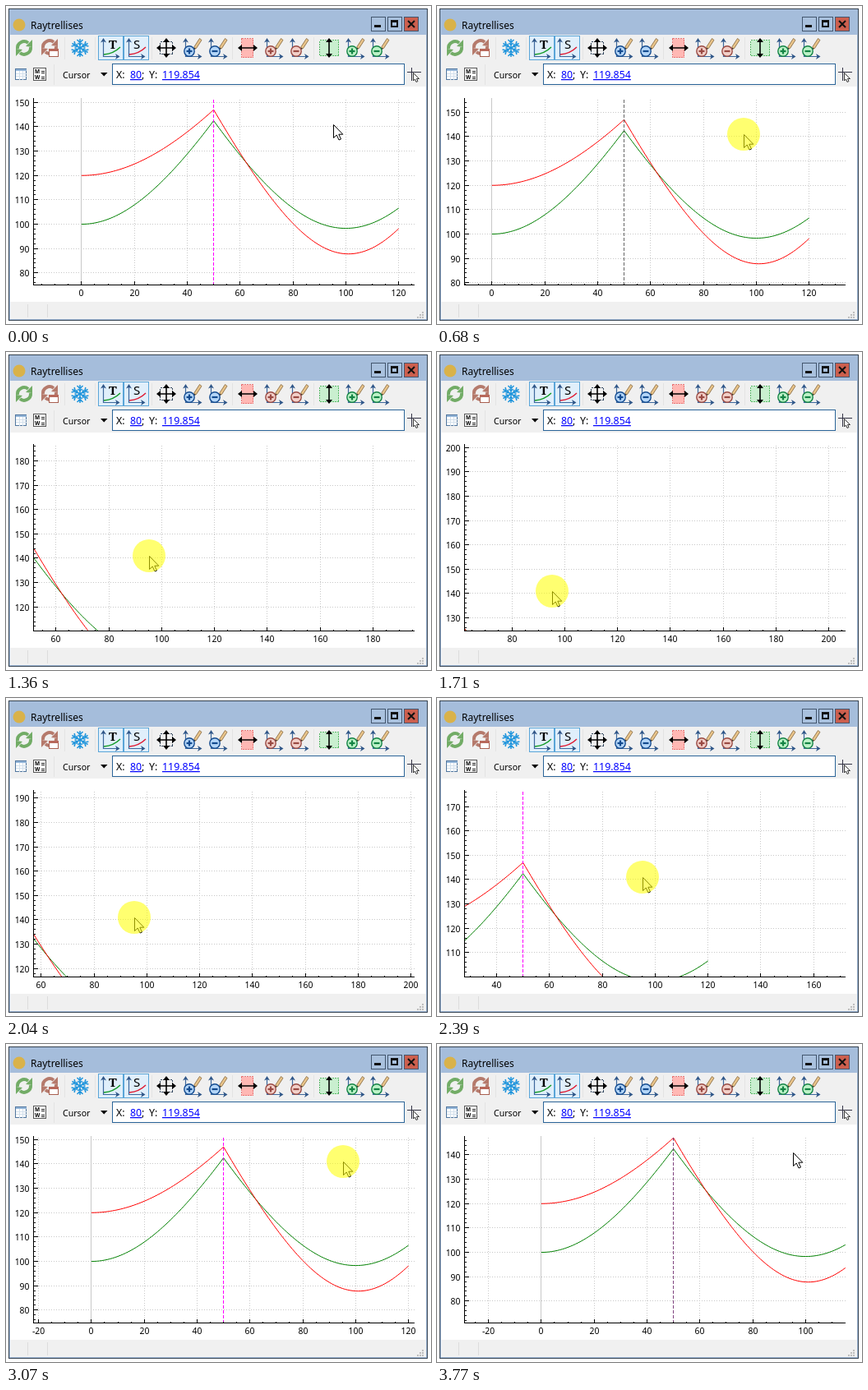
Recreate the animation shown at these times as an HTML page. Size 517x387 px, loop 5.27 s.

```html
<!DOCTYPE html>
<html lang="en">
<head>
<meta charset="utf-8">
<title>Raytrellises</title>
<style>
html, body { margin: 0; width: 100%; height: 100%; overflow: hidden; background: #fff; }
svg { display: block; position: absolute; left: 0; top: 0; }
text { font-family: "Noto Sans", "Open Sans", sans-serif; fill: #000; }
.tick { font-size: 10.4px; }
.crisp { shape-rendering: crispEdges; }
.link { fill: #00f; text-decoration: underline; }
.line { fill: none; stroke-width: 1; }
</style>
</head>
<body>
<svg width="517" height="387" viewBox="0 0 517 387">
  <defs>
    <clipPath id="area"><rect x="33" y="112" width="464" height="228"/></clipPath>
    <g id="axes">
      <path d="M-7.5-8V10.5H9" fill="none" stroke="#3d689c" stroke-width="1.2"/>
      <path d="M-11-6.5L-7.5-12L-4-6.5L-7.5-8ZM7 7L12.5 10.5L7 14L8.5 10.5Z" fill="#2f5688"/>
    </g>
    <g id="pencil">
      <path d="M3-1.5L9.5-11.5L12-9.5L5.5.5L2.5 2Z" fill="#e9c48a" stroke="#80643c" stroke-width=".8"/>
      <path d="M2.5 2L3-.5L4.8.8Z" fill="#333"/>
    </g>
    <g id="zoom">
      <use href="#axes"/><use href="#pencil"/>
      <circle cx="-3" cy="4" r="6.2" fill="var(--fill)" stroke="var(--ink)" stroke-width="1.4"/>
      <path d="M-6.5 4H.5" stroke="var(--ink)" stroke-width="2.2"/>
    </g>
    <path id="plus" d="M-3 .5V7.5" stroke="var(--ink)" stroke-width="2.2"/>
    <path id="across" d="M-12 0L-7-4V-.8H7V-4L12 0L7 4V.8H-7V4Z"/>
    <g id="refresh" fill="none" stroke="var(--ink)" stroke-width="4">
      <path d="M-8 1A8 8 0 0 1 5-6M8-1A8 8 0 0 1-5 6"/>
      <path d="M2-2L10-10V-1ZM-2 2L-10 10V1Z" fill="var(--ink)" stroke="none"/>
    </g>
    <g id="arm" fill="none" stroke="#1e94dc" stroke-width="1.5">
      <path d="M0 0V-11M-3.5-10L0-6.5L3.5-10M-2.5-6L0-3.5L2.5-6"/>
    </g>
  </defs>

  <rect width="517" height="387" fill="#fff"/>
  <g class="crisp">
    <rect x="3.5" y="3.5" width="509" height="379" fill="#a5bddb" stroke="#34414f"/>
    <rect x="5" y="35" width="506" height="346" fill="#f0f0f0"/>
    <rect x="5" y="98" width="506" height="262" fill="#fff"/>
    <path d="M26.5 363V379M50.5 363V379" stroke="#dcdcdc"/>
    <path d="M58.5 71V96M71.5 38V65M108.5 38V65M177.5 38V65M275.5 38V65M374.5 38V65" stroke="#e3e3e3"/>
    <path d="M506 372h2v2h-2zM506 375h2v2h-2zM506 378h2v2h-2zM503 375h2v2h-2zM503 378h2v2h-2zM500 378h2v2h-2z" fill="#bdbdbd"/>
  </g>

  <!-- title bar -->
  <circle cx="16" cy="23" r="7.5" fill="#d9b24a"/>
  <text x="30" y="27.5" font-size="12">Raytrellises</text>
  <g class="crisp">
    <g fill="#a9c1de" stroke="#43566e">
      <rect x="444.5" y="13.5" width="17" height="17"/>
      <rect x="464.5" y="13.5" width="17" height="17"/>
      <rect x="484.5" y="13.5" width="17" height="17" fill="#cc5f4e"/>
    </g>
    <path d="M448 23h8v3h-8zM468 17h9v9h-9zM470 20v4h5v-4z" fill="#111" fill-rule="evenodd"/>
  </g>
  <path d="M489 18L497 26M497 18L489 26" stroke="#111" stroke-width="2"/>

  <!-- upper tool row -->
  <use href="#refresh" x="22" y="51" style="--ink:#72ac66"/>
  <use href="#refresh" x="53" y="50" style="--ink:#b57a6c"/>
  <g class="crisp">
    <rect x="52.5" y="52.5" width="11" height="9" fill="#fff" stroke="#a85f50"/>
    <path d="M52 52h12v3H52z" fill="#b8685b"/>
  </g>
  <g id="flake" transform="translate(90 51)"></g>
  <g class="crisp" fill="#e0effb" stroke="#5aa5d8">
    <rect x="112.5" y="36.5" width="30" height="29"/>
    <rect x="143.5" y="36.5" width="30" height="29"/>
  </g>
  <use href="#axes" x="126" y="51"/>
  <use href="#axes" x="157" y="51"/>
  <path d="M119 59Q131 58 139 50" fill="none" stroke="#129b25" stroke-width="1.4"/>
  <path d="M150 59Q162 58 170 50" fill="none" stroke="#e01830" stroke-width="1.4"/>
  <g font-size="15" text-anchor="middle">
    <text x="130" y="52" font-weight="700" style="font-family:'Noto Serif',serif">T</text>
    <text x="159" y="52">S</text>
  </g>
  <rect class="crisp" x="187.5" y="43.5" width="15" height="15" fill="none" stroke="#33475f" stroke-dasharray="2 1"/>
  <use href="#across" x="195" y="51"/>
  <use href="#across" transform="translate(195 51) rotate(90)"/>
  <rect class="crisp" x="286.5" y="39.5" width="14" height="23" fill="#ffb8b4" stroke="#e87878" stroke-dasharray="2 1"/>
  <use href="#across" x="294" y="51"/>
  <rect class="crisp" x="381.5" y="41.5" width="23" height="19" fill="#c9efcf" stroke="#58b967" stroke-dasharray="2 1"/>
  <use href="#across" transform="translate(393 51) rotate(90)"/>
  <g id="zooms"></g>

  <!-- lower tool row -->
  <g class="crisp">
    <rect x="11.5" y="76.5" width="13" height="13" fill="#fff" stroke="#52779f"/>
    <path d="M12 77h13v2H12z" fill="#93b5d8"/>
    <path d="M12 82.5H25M12 85.5H25M16.5 79V90M20.5 79V90" stroke="#d3e0ec"/>
    <rect x="33.5" y="75.5" width="15" height="15" fill="#fff" stroke="#555"/>
    <path d="M43 79.5H47M43 81.5H47M43 86.5H47M43 88.5H47" stroke="#222"/>
    <rect x="129.5" y="70.5" width="355" height="25" fill="#fff" stroke="#2b6498"/>
    <path d="M493.5 75V91M488 80.5H505" stroke="#334"/>
  </g>
  <g font-size="6.5" font-weight="700"><text x="35" y="82">M</text><text x="35" y="89">W</text></g>
  <path d="M495.5 81.5V91L497.5 89L499 92.5L501 91.5L499.5 88.5H502.5Z" fill="#fff" stroke="#222" stroke-width=".9"/>
  <text x="69" y="88" font-size="10.6">Cursor</text>
  <path d="M115 81H123.5L119.2 85.5Z"/>
  <g font-size="12.4">
    <text x="134" y="88">X:</text><text x="151" y="88" class="link">80</text>
    <text x="165" y="88">;</text><text x="174" y="88">Y:</text>
    <text x="190" y="88" class="link">119.854</text>
  </g>

  <g id="plot"></g>
  <g id="pointer">
    <path d="M.5.5V16.5L4.2 13L7 19L9.5 18L6.8 12.2H11.8Z" fill="#fff" stroke="#000"/>
    <circle id="press" r="20" fill="#ff0" fill-opacity=".56"/>
  </g>
</svg>
<script>
const $ = id => document.getElementById(id);
const LOOP = 5270, HOME = [398, 144];
const SX = 3.215, SY = 2.9648;
const LEFT = 33.5, RIGHT = 496.5, TOP = 112, BASE = 339.5;
const MAGENTA = '#f0f';

// start time, pointer x, pointer y, pressed, marker colour
const steps = [
  [0, 398, 144, 0, MAGENTA],
  [330, 398, 144, 1, MAGENTA],
  [680, 373, 156, 1, '#666'],
  [1030, 274, 199, 1, MAGENTA],
  [1360, 174, 248, 1, MAGENTA],
  [1710, 140, 291, 1, MAGENTA],
  [2040, 156, 267, 1, MAGENTA],
  [2390, 250, 218, 1, MAGENTA],
  [2740, 338, 170, 1, MAGENTA],
  [3070, 410, 143, 1, MAGENTA],
  [3420, 433, 132, 1, '#804480'],
  [3770, 433, 132, 0, '#804480']
];

// beam size around a waist: waist, waist position, squared divergence
const beam = (w, x0, k) => x => Math.sqrt(w * w + k * (x - x0) ** 2);
const curves = [
  ['#008000', beam(100, 0, 4.12), beam(98.3, 100, 4.257)],
  ['#f00', beam(120, 0, 2.88), beam(87.8, 101, 5.344)]
];

const snap = v => Math.floor(v) + .5;
const path = (d, stroke, extra = '') => `<path class="line" d="${d}" stroke="${stroke}" ${extra}/>`;

function range(from, to, step) {
  const list = [];
  for (let v = Math.ceil(from / step) * step; v <= to; v += step) list.push(v);
  return list;
}

function drawPlot(dx, dy, marker) {
  const px = x => 91.85 + x * SX + dx;
  const py = y => 117.31 + (150 - y) * SY + dy;
  const x0 = (LEFT - px(0)) / SX, x1 = (RIGHT - px(0)) / SX;
  const y0 = 150 - (BASE - py(150)) / SY, y1 = 150 - (TOP - py(150)) / SY;
  let grid = '', ticks = `M${LEFT} ${TOP}V${BASE}H${RIGHT}`, zero = '', labels = '';

  for (const x of range(x0, x1, 5)) {
    const p = snap(px(x)), major = x % 20 === 0;
    ticks += `M${p} ${BASE}v${major ? -5 : -2}`;
    if (!major) continue;
    if (x === 0) zero = `M${p} ${TOP}V${BASE}`;
    else grid += `M${p} ${BASE}V${TOP}`;
    labels += `<text class="tick" x="${p}" y="353" text-anchor="middle">${x}</text>`;
  }
  for (const y of range(y0, y1, 2)) {
    const p = snap(py(y)), major = y % 10 === 0;
    ticks += `M${LEFT} ${p}h${major ? 5 : 2}`;
    if (!major) continue;
    grid += `M34 ${p}H${RIGHT}`;
    labels += `<text class="tick" x="28.5" y="${p + 4}" text-anchor="end">${y}</text>`;
  }

  const lines = curves.map(([color, before, after]) => {
    const pts = range(0, 120, 1).map(x =>
      px(x).toFixed(2) + ' ' + py((x < 50 ? before : after)(x)).toFixed(2));
    return path('M' + pts.join('L'), color);
  }).join('');
  const mark = snap(px(50));

  $('plot').innerHTML =
    `<g class="crisp">${path(grid, '#c8c8c8', 'stroke-dasharray="1 2"')}${path(zero, '#c8c8c8')}</g>` +
    `<g clip-path="url(#area)">${lines}` +
    path(`M${mark} ${BASE}V${TOP}`, marker, 'stroke-dasharray="4 2" shape-rendering="crispEdges"') +
    `</g><g class="crisp">${path(ticks, '#000')}</g>${labels}`;
}

function drawIcons() {
  $('flake').innerHTML = range(0, 300, 60)
    .map(a => `<use href="#arm" transform="rotate(${a})"/>`).join('');
  const kinds = [
    [226, 257, '#b4d6f8', '#124a8f'],
    [325, 356, '#f2d0c9', '#9a4a43'],
    [424, 454, '#bdf2c8', '#138344']
  ];
  $('zooms').innerHTML = kinds.map(([a, b, fill, ink]) =>
    `<g style="--fill:${fill};--ink:${ink}"><use href="#zoom" x="${a}" y="51"/>` +
    `<use href="#plus" x="${a}" y="51"/><use href="#zoom" x="${b}" y="51"/></g>`).join('');
}

let shown = null;
function tick() {
  const t = performance.now() % LOOP;
  const step = steps.filter(s => s[0] <= t).pop();
  if (step !== shown) {
    shown = step;
    const [, x, y, pressed, marker] = step;
    drawPlot(x - HOME[0], y - HOME[1], marker);
    $('pointer').setAttribute('transform', `translate(${x} ${y})`);
    $('press').setAttribute('visibility', pressed ? 'visible' : 'hidden');
  }
  requestAnimationFrame(tick);
}

drawIcons();
tick();
</script>
</body>
</html>
```
